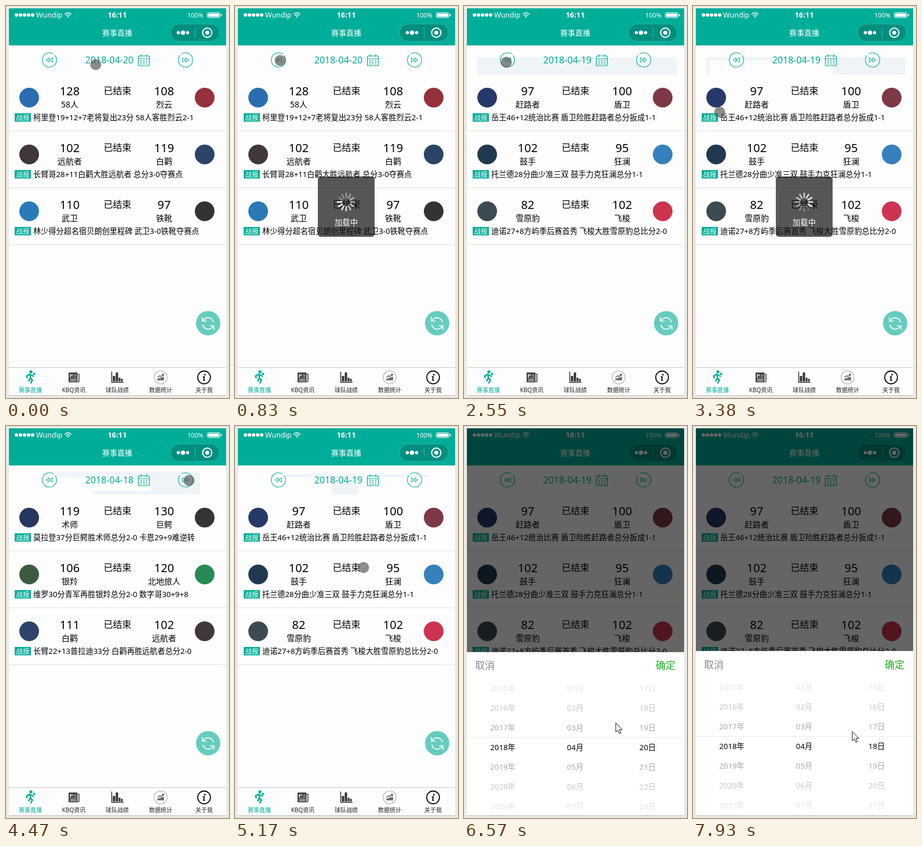
Recreate the animation shown at these times as an HTML page. Size 385 px wide and 676 px high, loop 8000 ms.

```html
<!DOCTYPE html>
<html lang="zh-CN">
<head>
<meta charset="utf-8">
<title>赛事直播</title>
<style>
html, body { margin: 0; width: 100%; height: 100%; overflow: hidden; background: #ebeae6; }
svg { display: block; }
#stage { position: absolute; left: 0; top: 0; }
text { font-family: 'Noto Sans', 'Noto Sans CJK SC', 'Noto Sans CJK', sans-serif; text-anchor: middle; white-space: pre; }
.left { text-anchor: start; }
.line { fill: none; stroke-linecap: round; stroke-linejoin: round; }
</style>
</head>
<body>
<svg id="stage" width="385" height="676" viewBox="0 0 385 676"></svg>
<script>
const TEAL = '#00ad98', SOFT = '#35bcab', ROW = 98;

const text = (x, y, size, str, fill = '#000', extra = '') =>
  `<text x="${x}" y="${y}" font-size="${size}" fill="${fill}" ${extra}>${str}</text>`;
const rect = (x, y, w, h, fill, extra = '') =>
  `<rect x="${x}" y="${y}" width="${w}" height="${h}" fill="${fill}" ${extra}/>`;
const dot = (x, y, r, fill, extra = '') =>
  `<circle cx="${x}" cy="${y}" r="${r}" fill="${fill}" ${extra}/>`;
const line = (d, stroke, width = 1, extra = '') =>
  `<path class="line" d="${d}" stroke="${stroke}" stroke-width="${width}" ${extra}/>`;
const range = (a, b, fn) => Array.from({ length: b - a + 1 }, (_, i) => fn(a + i)).join('');

const teamColor = {
  '58人': '#2a6db0', '烈云': '#96303a', '远航者': '#40373a', '白鹳': '#2d4468',
  '武卫': '#2a7ab8', '铁靴': '#333', '赶路者': '#27396a', '盾卫': '#7d3945',
  '鼓手': '#20394f', '狂澜': '#3580bd', '雪原豹': '#3c4a52', '飞梭': '#cc3450',
  '术师': '#25365f', '巨鳄': '#353336', '银羚': '#3c5a40', '北地旅人': '#278a52'
};

const days = [
  ['2018-04-20', [
    ['58人', 128, '烈云', 108, '柯里登19+12+7老将复出23分 58人客胜烈云2-1'],
    ['远航者', 102, '白鹳', 119, '长臂哥28+11白鹳大胜远航者 总分3-0夺赛点'],
    ['武卫', 110, '铁靴', 97, '林少得分超名宿贝朗创里程碑 武卫3-0铁靴夺赛点']]],
  ['2018-04-19', [
    ['赶路者', 97, '盾卫', 100, '岳王46+12统治比赛 盾卫险胜赶路者总分扳成1-1'],
    ['鼓手', 102, '狂澜', 95, '托兰德28分曲少准三双 鼓手力克狂澜总分1-1'],
    ['雪原豹', 82, '飞梭', 102, '迪诺27+8方屿季后赛首秀 飞梭大胜雪原豹总比分2-0']]],
  ['2018-04-18', [
    ['术师', 119, '巨鳄', 130, '莫拉登37分巨鳄胜术师总分2-0 卡恩29+9难逆转'],
    ['银羚', 106, '北地旅人', 120, '维罗30分青军再胜银羚总分2-0 数字哥30+9+8'],
    ['白鹳', 111, '远航者', 102, '长臂22+13普拉迪33分 白鹳再胜远航者总分2-0']]]
];

const side = (x, logoX, name, score) =>
  dot(logoX, 158, 17, teamColor[name]) + text(x, 154, 20, score) + text(x, 174.5, 14, name);

const game = ([home, a, away, b, news], i) => `<g transform="translate(0 ${i * ROW})">
  ${side(110, 40, home, a)}${side(273, 343, away, b)}
  ${text(192.5, 152, 16, '已结束')}
  ${rect(15, 185, 28, 14.5, TEAL)}${text(29, 196.5, 11.5, '战报', '#fff')}
  ${text(47, 197, 13.2, news, '#000', 'class="left"')}
  ${rect(5, 215, 375, 1, '#e3e3e3')}</g>`;

const dayList = ([date, games]) =>
  `<g class="day">${text(178.5, 99, 16, date, TEAL)}${games.map(game).join('')}</g>`;

// Pale areas left behind in the date row
const tints = [
  [[23, 88, 344, 30]],
  [[23, 88, 344, 6], [23, 94, 6, 24], [241, 94, 126, 24]],
  [[87, 80, 248, 8], [250, 88, 85, 30], [150, 112, 100, 6]],
  [[87, 83, 248, 5], [168, 88, 45, 30]]
].map(list => `<g class="tint">${list.map(r => rect(...r, '#eff4f8')).join('')}</g>`).join('');

const statusBar = rect(5, 4, 375, 64, TEAL) +
  range(0, 4, i => dot(18 + 7 * i, 15.5, 3, '#fff')) +
  text(52, 19.5, 12.5, 'Wundip', '#fff', 'class="left"') +
  line('M101.5 14q5.5-5 11 0M103.7 16.5q3.3-3 6.6 0', '#fff', 1.5) + dot(107, 18.5, 1.2, '#fff') +
  text(192, 19.5, 12.8, '16:11', '#fff', 'font-weight="600"') +
  text(327, 20, 11, '100%', '#fff') +
  rect(347.5, 11.5, 22, 8.5, 'none', 'rx="2" stroke="#fff"') + rect(349, 13, 19, 5.5, '#fff') +
  rect(371, 14, 1.8, 3.5, '#fff') +
  text(192, 51, 13, '赛事直播', '#fff', 'font-weight="500"') +
  rect(284, 31, 84.5, 30, '#008f7e', 'rx="15" stroke="#33b5a4"') +
  dot(297.5, 46, 2.8, '#fff') + dot(305.5, 46, 3.8, '#fff') + dot(313.5, 46, 2.8, '#fff') +
  rect(326, 37, 1, 18, '#33b5a4') +
  dot(347.5, 46, 8, 'none', 'stroke="#fff" stroke-width="2"') + dot(347.5, 46, 3.5, '#fff');

const skip = (x, flip) => `<g transform="translate(${x} 93) scale(${flip} 1)">
  ${dot(0, 0, 12.4, 'none', `stroke="${SOFT}" stroke-width="1.4" stroke-dasharray="74 4" transform="rotate(-40)"`)}
  ${line('M-.5-3.7L-5.5 0-.5 3.7zM5.5-3.7L.5 0 5.5 3.7z', SOFT, 1.1)}</g>`;

const calendar = line('M230.5 86h15a2 2 0 0 1 2 2v13a2 2 0 0 1-2 2h-15a2 2 0 0 1-2-2v-13a2 2 0 0 1 2-2zM228.5 91h19M233 83.5v4M243 83.5v4', TEAL, 1.2) +
  range(0, 8, i => rect(232 + i % 3 * 4.8, 93.5 + Math.floor(i / 3) * 2.9, 2.6, 1.5, SOFT));

const arrowHalf = 'M358 545a9.5 9.5 0 0 0-16-4.5l-2.5 2.5M339 537v6.5h6.5';
const refresh = dot(349, 547, 21, '#66ccbf') + line(arrowHalf, '#fff', 1.6) +
  line(arrowHalf, '#fff', 1.6, 'transform="rotate(180 349 547.5)"');

const tabBar = rect(5, 623, 375, 48, '#fdfdfd') + rect(5, 623, 375, 1, '#c8c8c8') +
  dot(43, 631, 2.7, TEAL) + dot(48.5, 634.5, 2, TEAL) +
  line('M41 635.5l1.5 6M40.5 635l-5 3 1 3M43 636l4.5 2.5', TEAL, 2.4) +
  line('M42 641.5l3.5 3.5-2.5 5M41.5 642l-2 4.5', TEAL, 2.5) +
  rect(108, 632, 15.5, 17, '#444', 'rx="1"') + line('M124.5 635h1.5v12l-1.5 1.5', '#444', 1.6) +
  rect(110.5, 635.5, 5, 5, '#fff') + rect(112, 637, 3.5, 3.5, '#444') +
  line('M118 636.5h3M118 640h3M111 643.5h10M111 646.3h10', '#eee', 1.2) +
  line('M182.5 631v18h20', '#333', 1.5) + rect(184.5, 638, 4, 9.5, '#333') +
  rect(189.5, 632, 4, 15.5, '#333') + rect(194.5, 641, 3, 6.5, '#333') + rect(198.5, 643, 3, 4.5, '#333') +
  dot(267, 640.5, 11.2, 'none', 'stroke="#aaa" stroke-width="1.1"') +
  range(0, 3, i => rect(261.5 + 2.9 * i, 642.5 - i, 2.3, 3 + i, '#444')) +
  line('M262 640l3.5-2.5 2 1.5 4.5-4M269.5 635h2.5v2.5', '#444', 1.2) +
  dot(342, 640.5, 11, 'none', 'stroke="#111" stroke-width="1.8"') +
  dot(343.3, 635.8, 1.5, '#111') + line('M340.5 639.5h2l-1.5 6h2', '#111', 1.8) +
  ['赛事直播', 'KBQ资讯', '球队战绩', '数据统计', '关于我']
    .map((label, i) => text(42 + 75 * i, 666, 10, label, i ? '#222' : TEAL, i ? '' : 'font-weight="500"')).join('');

const loading = `<g id="loading">${rect(143, 294, 98, 104, 'rgba(17,17,17,.7)', 'rx="5"')}
  <g id="spinner">${range(1, 12, i => line('M0-8V-15', '#fff', 2.6,
    `opacity="${(.2 + i / 15).toFixed(2)}" transform="rotate(${i * 30})"`))}</g>
  ${text(192, 378, 13.3, '加载中', '#fff')}</g>`;

const pad = n => String(n).padStart(2, '0');
const wheel = (x, first, last, mid, unit) =>
  range(first, last, n => text(x, 557 + (n - mid) * 34, 13.2, pad(n) + unit));
const picker = `<g id="picker">${rect(5, 388, 375, 284, '#fff')}
  ${text(36, 417.5, 17, '取消', '#888')}${text(348, 417.5, 17, '确定', '#1aad19')}
  <svg x="5" y="433" width="375" height="238" viewBox="5 433 375 238">
    ${wheel(67, 2015, 2021, 2018, '年')}${wheel(192, 1, 7, 4, '月')}
    <g id="dates">${wheel(317, 14, 24, 18, '日')}</g>
    ${rect(5, 433, 375, 102, 'url(#fade)')}
    ${rect(5, 433, 375, 102, 'url(#fade)', 'transform="translate(0 1104) scale(1 -1)"')}
    ${rect(5, 535, 375, 1, '#ebebeb')}
  </svg></g>`;

const stage = document.getElementById('stage');
stage.innerHTML = `<defs><linearGradient id="fade" x2="0" y2="1">
    <stop stop-color="#fff" stop-opacity=".95"/><stop offset="1" stop-color="#fff" stop-opacity=".6"/>
  </linearGradient></defs>
  ${rect(5, 671, 375, 1.5, '#cfcecb')}
  <svg x="5" y="4" width="375" height="667" viewBox="5 4 375 667">
    ${rect(5, 4, 375, 667, '#fdfdfd')}${tints}${statusBar}
    ${skip(75, 1)}${skip(310, -1)}${calendar}
    ${days.map(dayList).join('')}${refresh}${tabBar}${loading}
    ${rect(5, 4, 375, 667, '#000', 'id="shade"')}${picker}
  </svg>
  ${dot(0, 0, 9.5, 'rgba(80,80,80,.65)', 'id="touch"')}
  <path id="arrow" d="M0 0V16l3.6-3.4 2.7 6 2.5-1.1-2.6-5.8h5.1z" fill="#fff" stroke="#111"/>`;

const $ = id => document.getElementById(id);
const show = (el, on) => el.setAttribute('display', on ? 'inline' : 'none');
const move = (el, x, y) => el.setAttribute('transform', `translate(${x} ${y})`);
const clamp = v => Math.min(1, Math.max(0, v));

// Bursts of change: start, end, number of steps; the picture rests between them
const bursts = [[130, 400, 3], [830, 1340, 5], [2020, 2550, 5], [2960, 3930, 8], [4080, 4470, 4],
  [4750, 5170, 4], [5600, 6020, 4], [6300, 6690, 4], [7120, 7930, 7]];
function snap(t) {
  let s = 0;
  for (const [a, b, n] of bursts) {
    if (t < a) break;
    const step = (b - a) / (n - 1);
    s = Math.min(b, a + Math.floor((t - a) / step + 1e-6) * step);
  }
  return s;
}

// Pointer: time, x, y
const path = [[0, 155, 101], [400, 78, 91], [830, 78, 94], [1340, 87, 204], [2153, 132, 148],
  [2550, 73, 97], [2960, 73, 97], [3375, 46, 183], [3930, 159, 148], [4470, 316, 94],
  [4750, 316, 94], [5170, 222, 244], [6020, 178, 98], [6300, 201, 187], [6560, 262, 512],
  [6690, 281, 467], [6985, 281, 467], [7930, 275, 527]];
function pointerAt(s) {
  const i = Math.max(1, path.findIndex(k => k[0] >= s));
  const [t0, x0, y0] = path[i - 1], [t1, x1, y1] = path[i];
  const p = clamp((s - t0) / (t1 - t0));
  return [x0 + (x1 - x0) * p, y0 + (y1 - y0) * p];
}

const phase = (s, limits) => limits.filter(l => s >= l).length;
const dayEls = [...document.querySelectorAll('.day')];
const tintEls = [...document.querySelectorAll('.tint')];

function render(t) {
  const s = snap(t);
  const day = [0, 1, 2, 1][phase(s, [1200, 3650, 5020])];
  dayEls.forEach((el, i) => show(el, i === day));
  const tint = phase(s, [1200, 3100, 3650, 5020, 6400]) - 1;
  tintEls.forEach((el, i) => show(el, i === tint));

  show($('loading'), phase(s, [830, 1200, 2960, 3650, 4750, 5020]) % 2);
  $('spinner').setAttribute('transform', `translate(192 338) rotate(${Math.floor(s * .012) * 30})`);

  const open = clamp((s - 6300) / 290);
  show($('picker'), open > 0);
  move($('picker'), 0, 283 * (1 - open) ** 2.2);
  $('shade').setAttribute('opacity', .6 * clamp((s - 6300) / 200));
  move($('dates'), 0, -68 * (1 - clamp((s - 6985) / 945)));

  const arrow = s >= 6300, [x, y] = pointerAt(s);
  show($('arrow'), arrow);
  show($('touch'), !arrow);
  move($(arrow ? 'arrow' : 'touch'), x, y);
}

const start = performance.now();
function tick(now) {
  render(Math.max(0, now - start) % 8000);
  requestAnimationFrame(tick);
}
render(0);
requestAnimationFrame(tick);
</script>
</body>
</html>
```
